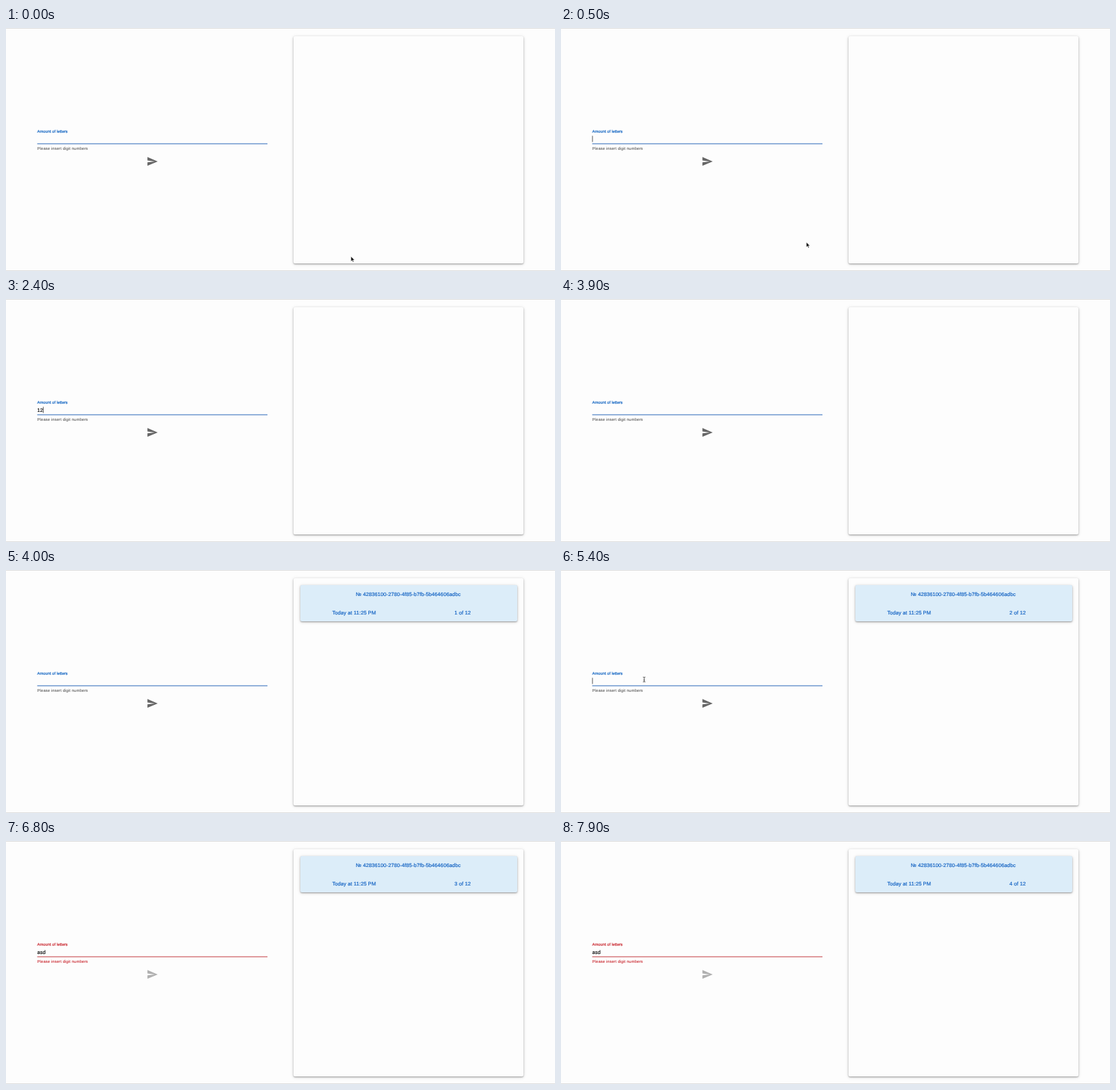
Animation, 800 px wide and 355 px high, one loop 8 s. Source, as an HTML page:

```html
<!DOCTYPE html>
<html lang="en">
<head>
<meta charset="utf-8">
<title>Letter form</title>
<style>
  html, body { margin: 0; width: 100%; height: 100%; overflow: hidden; background: #fdfdfd; }
  #stage { position: relative; width: 800px; height: 355px; overflow: hidden; }
  .edge { position: absolute; left: 0; width: 800px; height: 1px; background: #dedede; }
  .panel, .card {
    position: absolute; border-radius: 2px;
    box-shadow: 0 1px 2px rgba(0,0,0,.32), 0 1px 5px rgba(0,0,0,.17);
  }
  .panel { left: 419px; top: 12px; width: 335px; height: 332px; background: #fdfdfd; }
  .card { left: 428.5px; top: 21.5px; width: 316.5px; height: 53.5px; background: #dcedf9; }
  svg { position: absolute; inset: 0; }
  text {
    font-family: "Liberation Sans", Arial, sans-serif; text-rendering: geometricPrecision;
    fill: var(--ink); stroke: var(--ink); stroke-width: .18px;
  }
  #form { --main: #0b60c0; --line: #2a68b8; --hint: #5c5c5c; --icon: #666; }
  #form.error { --main: #c8232b; --line: #c23a40; --hint: #c8232b; --icon: #b0b0b0; }
  .label { font-size: 5.85px; --ink: var(--main); }
  .hint { font-size: 5.8px; letter-spacing: .14px; stroke-width: .08px; --ink: var(--hint); }
  .line { fill: var(--line); }
  .icon { fill: var(--icon); }
  #value { font-size: 7.5px; --ink: #111; }
  #ticket text { font-size: 7.5px; letter-spacing: .1px; --ink: #0f60c2; }
</style>
</head>
<body>
<div id="stage">
  <div class="edge" style="top:0"></div>
  <div class="edge" style="top:354px"></div>
  <div class="panel"></div>
  <div class="card" id="card"></div>
  <svg width="800" height="355">
    <g id="form">
      <text class="label" x="45.6" y="152.6">Amount of letters</text>
      <text id="value" x="45.6" y="164.8"></text>
      <rect id="caret" y="157.5" width=".8" height="9" fill="#333"/>
      <rect class="line" x="45.5" y="168.6" width="335.5" height="1"/>
      <text class="hint" x="45.6" y="177.9">Please insert digit numbers</text>
      <path class="icon" transform="translate(204.7 186.4) scale(.71)" d="M2 21 23 12 2 3v7l15 2-15 2z"/>
    </g>
    <g id="ticket">
      <text x="509.8" y="37.6">№ 42836100-2780-4f85-b7fb-5b464606adbc</text>
      <text x="475.4" y="64.6">Today at 11:25 PM</text>
      <text id="count" x="653.6" y="64.6"></text>
    </g>
    <path id="arrow" d="M0 0v7.2l1.7-1.6 1.2 2.7 1.2-.5-1.2-2.6h2.3z" fill="#111" stroke="#fff" stroke-width=".5"/>
    <path id="beam" d="M-1.7-3.6Q0-3.6 0-2.8 0-3.6 1.7-3.6M0-3V3M-1.7 3.6Q0 3.6 0 2.8 0 3.6 1.7 3.6M-.9.9H.9" fill="none" stroke="#333" stroke-width=".8"/>
  </svg>
</div>
<script>
  const LOOP = 8000, TICK = 100, BLINK = 500;
  const FOCUSED = 100, CLEARED = 3000, INVALID = 5800;
  const keys = [
    { at: 2300, char: "1" }, { at: 2400, char: "2" },
    { at: INVALID, char: "a" }, { at: 5900, char: "s" }, { at: 6300, char: "d" }
  ];

  const $ = id => document.getElementById(id);
  const show = (el, on) => el.style.display = on ? "" : "none";
  const progress = (t, from, to) => Math.min(1, Math.max(0, (t - from) / (to - from)));
  const smooth = k => k * k * (3 - 2 * k);
  const mix = (a, b, k) => a + (b - a) * k;
  const curve = (a, b, c, k) => mix(mix(a, b, k), mix(b, c, k), k);

  // The pointer sweeps to the field, hides while typing, then shifts a little.
  function pointerAt(t) {
    const hidden = t >= keys[0].at && t < 4900 || t >= INVALID;
    const sweep = smooth(progress(t, 0, 1000)), shift = progress(t, 4900, 5200);
    return {
      x: curve(502.7, 400, 127.4, sweep) - 6.2 * shift,
      y: curve(333.8, 380, 158.3, sweep) + 1.7 * shift,
      hidden
    };
  }

  function drawField(t) {
    const pressed = keys.filter(key => key.at <= t);
    const text = pressed.filter(key => t < CLEARED || key.at > CLEARED).map(key => key.char).join("");
    $("value").textContent = text;
    $("form").classList.toggle("error", t >= INVALID);

    // Each key press restarts the blinking.
    const restart = pressed.at(-1)?.at ?? FOCUSED;
    show($("caret"), t >= restart && (t - restart) % (2 * BLINK) < BLINK);
    $("caret").setAttribute("x", 45.5 + (text ? $("value").getComputedTextLength() : 0));
  }

  function drawTicket(t) {
    const sent = Math.floor(t / 1000) - 3;
    show($("card"), sent > 0);
    show($("ticket"), sent > 0);
    $("count").textContent = `${sent} of 12`;
  }

  function drawPointer(t) {
    const { x, y, hidden } = pointerAt(t);
    const overField = x < 381 && y < 168;
    show($("arrow"), !hidden && !overField);
    show($("beam"), !hidden && overField);
    $(overField ? "beam" : "arrow").setAttribute("transform", `translate(${x} ${y})`);
  }

  const begin = performance.now();
  function frame() {
    const elapsed = (performance.now() - begin) % LOOP;
    const t = Math.floor(elapsed / TICK) * TICK;
    drawField(t);
    drawTicket(t);
    drawPointer(t);
    requestAnimationFrame(frame);
  }
  frame();
</script>
</body>
</html>
```
